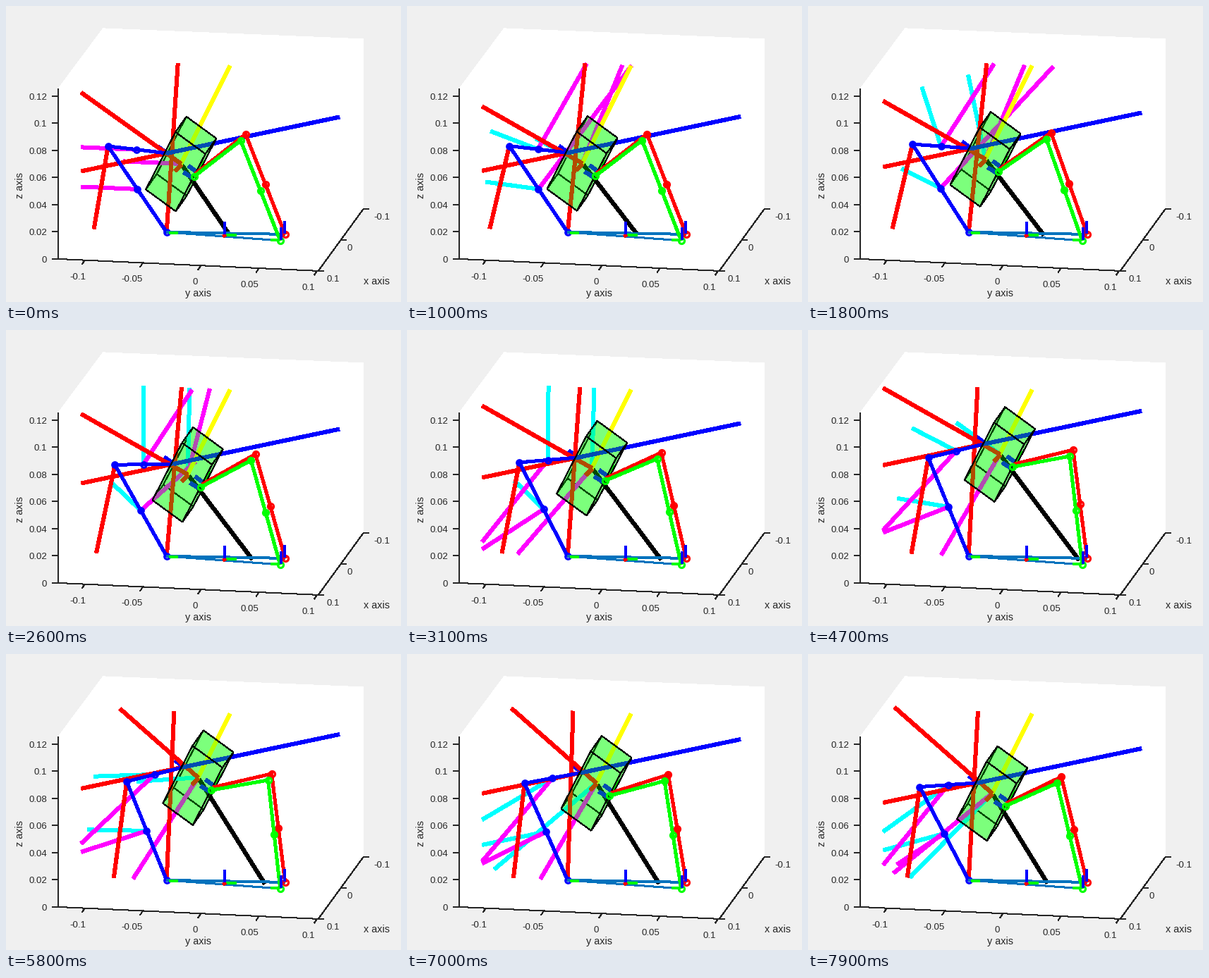
A matplotlib script for the animation above (8000 ms loop, 560 by 420 pixels).

```python
import numpy as np
import matplotlib.pyplot as plt
from matplotlib.animation import FuncAnimation

W, H, DPI = 560, 420, 100
PX = 72 / DPI
STEPS, HOLD, RISE = 80, 4, 50

plt.rcParams["font.family"] = "Liberation Sans"
fig = plt.figure(figsize=(W / DPI, H / DPI), dpi=DPI, facecolor="#f0f0f0")
ax = fig.add_axes([0, 0, 1, 1])
ax.set_xlim(0.3, W + 0.3)
ax.set_ylim(H - 0.9, -0.9)
ax.axis("off")


# ---- motion -------------------------------------------------------------
def travel(k):
    """Minimum-jerk rise, then the same way back: place, speed, acceleration."""
    back = k > RISE
    s = (k - RISE - 1 if back else k) / RISE
    place = s**3 * (10 - 15 * s + 6 * s * s)
    speed = 30 * s**2 * (1 - s)**2
    accel = 60 * s * (1 - s) * (1 - 2 * s)
    return (1 - place, -speed, -accel) if back else (place, speed, accel)


def swing(pivot, start, end, f):
    """Turn about the pivot from start to end."""
    a, b = np.subtract(start, pivot), np.subtract(end, pivot)
    r = np.hypot(*a) * (1 - f) + np.hypot(*b) * f
    t = np.arctan2(a[1], a[0]) * (1 - f) + np.arctan2(b[1], b[0]) * f
    return pivot + r * np.array([np.cos(t), np.sin(t)])


REACH = np.array([24.2, -48.7])
BASE = np.array([228, 320])
HIP = np.array([228.5, 208])
CENTRE = np.array([248.5, 223])
RED_FOOT, RED_GRIP = np.array([396, 323]), np.array([269, 237])
GREEN_FOOT, GREEN_GRIP = np.array([389, 332]), np.array([267, 241])
REST = np.array([-82, -3.5])  # joint vectors while nothing moves
LEFT, RIGHT, TILT = 107, 473, 0.046


def top(x):
    return 69.3 + TILT * x


def bottom(x):
    return 309.5 + TILT * x


def clip(p, v):
    """End of the vector v from p, cut at the sides of the plot volume."""
    t = 1.0
    if v[0]:
        t = min(t, max((LEFT - p[0]) / v[0], (RIGHT - p[0]) / v[0]))
    climb = v[1] - TILT * v[0]
    if climb:
        t = min(t, max((top(p[0]) - p[1]) / climb, (bottom(p[0]) - p[1]) / climb))
    return p + t * v


# ---- fixed parts --------------------------------------------------------
def line(color, width, z, pts=((0, 0), (0, 0)), **kw):
    xs, ys = zip(*pts)
    return ax.plot(xs, ys, color=color, lw=width * PX, zorder=z, antialiased=False,
                   solid_capstyle="butt", **kw)[0]


INK = "#262626"
ax.fill(*zip((138, 31), (507, 46), (507, 287), (443, 375), (74, 358), (74, 117)),
        color="white", lw=0, zorder=0, antialiased=False)
line(INK, 1, 1, [(74, 117), (74, 358), (443, 375), (507, 287)])


def label(x, y, s, size=13.2, ha="center", **kw):
    ax.text(x, y, s, size=size * PX, color=INK, ha=ha, va="center_baseline", **kw)


for i, s in enumerate(["0", "0.02", "0.04", "0.06", "0.08", "0.1", "0.12"]):
    y = 358 - 38.5 * i
    line(INK, 1, 1, [(66, y - 0.4), (74, y)])
    label(58.2, y + 0.6, s, ha="right")
for i, s in enumerate(["-0.1", "-0.05", "0", "0.05", "0.1"]):
    x, y = 112 + 82.3 * i, 359.8 + 3.78 * i
    line(INK, 1, 1, [(x, y), (x - 4, y + 6)])
    label(x - 8.5 - 1.3 * len(s) * (i != 2) + 4 * (i == 0), y + 22.5, s)
for i, s in enumerate(["0.1", "0", "-0.1"]):
    x, y = 443 + 32 * i, 375 - 44 * i
    line(INK, 1, 1, [(x, y), (x + 8, y + 0.5)])
    label(x + 17 + 4.5 * (len(s) - 2), y + 10.5, s)
label(272.5, 406, "y axis", 14.4)
label(525.5, 389, "x axis", 14.4)
label(20.5, 241, "z axis", 14.4, rotation=90)

STEEL = "#0072bd"
line(STEEL, 3, 10, [BASE, RED_FOOT])
line(STEEL, 2, 10, [BASE, GREEN_FOOT])
line("lime", 4, 11, [(231, 321), (244, 321)])
line("lime", 4, 11, [(311, 324), (327, 324)])
line("lime", 4, 13, [(375, 331), (389, 331)])
line("red", 4, 11, [(308, 326), (312, 324)])
for x, y in [(310, 323), (390, 331), (395, 322)]:
    line("blue", 4, 14, [(x, y), (x, y - 18)])


# ---- moving parts -------------------------------------------------------
def leg(color, z, ring, marks):
    return line(color, 4, z, marker="o", ms=ring * PX, mfc="none", mew=3.2 * PX,
                markevery=marks)


cyan = [line("cyan", 5, 4) for _ in range(3)]
magenta = [line("magenta", 5, 4.5) for _ in range(3)]
red_ray, red_side, red_up, red_down = [line("red", 5, 5) for _ in range(4)]
yellow = line("yellow", 5, 4.8)
black = line("black", 5, 4.7)
blue_side = line("blue", 5, 5.2)
left_leg = leg("blue", 5.3, 7.5, [0, 1, 2, 3])
red_leg = leg("red", 12, 8, [0, 1, 2])
green_leg = leg("lime", 12.5, 8, [0, 1, 2, 3])
marks = [  # short frame axes that ride on the box
    (line("blue", 5, 4.9), HIP, HIP - (13, 9.5)),
    (line("blue", 5, 5.5), (259, 226), (270, 234)),
    (line("blue", 5, 5.5), (252, 235), (265, 243)),
    (line("lime", 4, 5.4), (271, 236), (280, 219)),
    (line("red", 5, 5.5), (249, 224), (240, 233)),
]

# box outline from one corner and three edges
CORNER = np.array([256, 156])
U, V, N = np.array([42.5, 31]), np.array([-42, 81.5]), np.array([-15.5, 22])
HULL = CORNER + np.array([0 * U, U, U + V, U + V + N, V + N, N])
NEAR, FAR = CORNER + U + N, CORNER + V
shells = [ax.fill(HULL[:, 0], HULL[:, 1], fc=(0, 1, 0, 0.3), ec="none", zorder=z)[0]
          for z in (3, 7)]
edges = [(line("black", 1, 8), HULL[i], HULL[(i + 1) % 6]) for i in range(6)]
edges += [(line("black", 1, 8), NEAR, HULL[i]) for i in (1, 3, 5)]
edges += [(line("black", 1, 3.5), FAR, HULL[i]) for i in (0, 2, 4)]


def put(artist, *pts):
    artist.set_data(*zip(*pts))


def draw(i):
    f, speed, accel = travel(max(0, i - HOLD))
    drag = np.sign(speed)
    d = REACH * f
    hip, centre = HIP + d, CENTRE + d
    elbow = swing(BASE, (145, 198), (171.5, 180), f)
    upper = elbow + 0.485 * (hip - elbow)
    lower = (elbow + BASE) / 2

    # per joint: speed gain, acceleration gain, gain of speed squared
    gains = [(upper, (45, -66), (70, -93), (8, 19)),
             (lower, (22, -20), (62, 30 * f - 60), (15, 6)),
             (centre, 1.95 * REACH, 4 * REACH, (0, 0))]
    for c, m, (joint, by_speed, by_accel, by_square) in zip(cyan, magenta, gains):
        put(c, joint, clip(joint, REST + speed * np.array(by_speed)))
        force = accel * np.array(by_accel) + speed**2 * np.array(by_square)
        put(m, joint, clip(joint, REST + force))

    tilt = np.radians(35.5 - 5.9 * drag)
    put(red_ray, centre, clip(centre, -400 * np.array([np.cos(tilt), np.sin(tilt)])))
    put(red_side, hip, clip(hip, np.array([-400, 84])))
    put(blue_side, hip, clip(hip, np.array([400, -84])))
    x = 244 + f + 2.5 * drag + 1.3 * accel
    put(red_up, BASE, (x, top(x)))
    x = 125 + 22 * f - 3.8 * drag - 0.8 * accel
    put(red_down, elbow, (x, bottom(x)))
    x = 317 + 59.5 * f + 9.3 * drag
    put(black, centre, (x, 323.5 + 0.03 * (x - 317)))
    put(yellow, centre, (318, 84))

    put(left_leg, BASE, lower, elbow, upper, hip)
    knee = swing(RED_FOOT, (340, 181), (377, 169), f)
    put(red_leg, RED_FOOT, (RED_FOOT + knee) / 2, knee, RED_GRIP + d)
    knee = swing(GREEN_FOOT, (333, 190), (372, 178), f)
    put(green_leg, GREEN_FOOT, (GREEN_FOOT + knee) / 2, knee, GREEN_GRIP + d)

    for shell in shells:
        shell.set_xy(HULL + d)
    for artist, a, b in edges + marks:
        put(artist, a + d, b + d)
    return []


anim = FuncAnimation(fig, draw, frames=STEPS, interval=100, repeat=True,
                     repeat_delay=0, init_func=lambda: draw(0))
plt.show()
```
